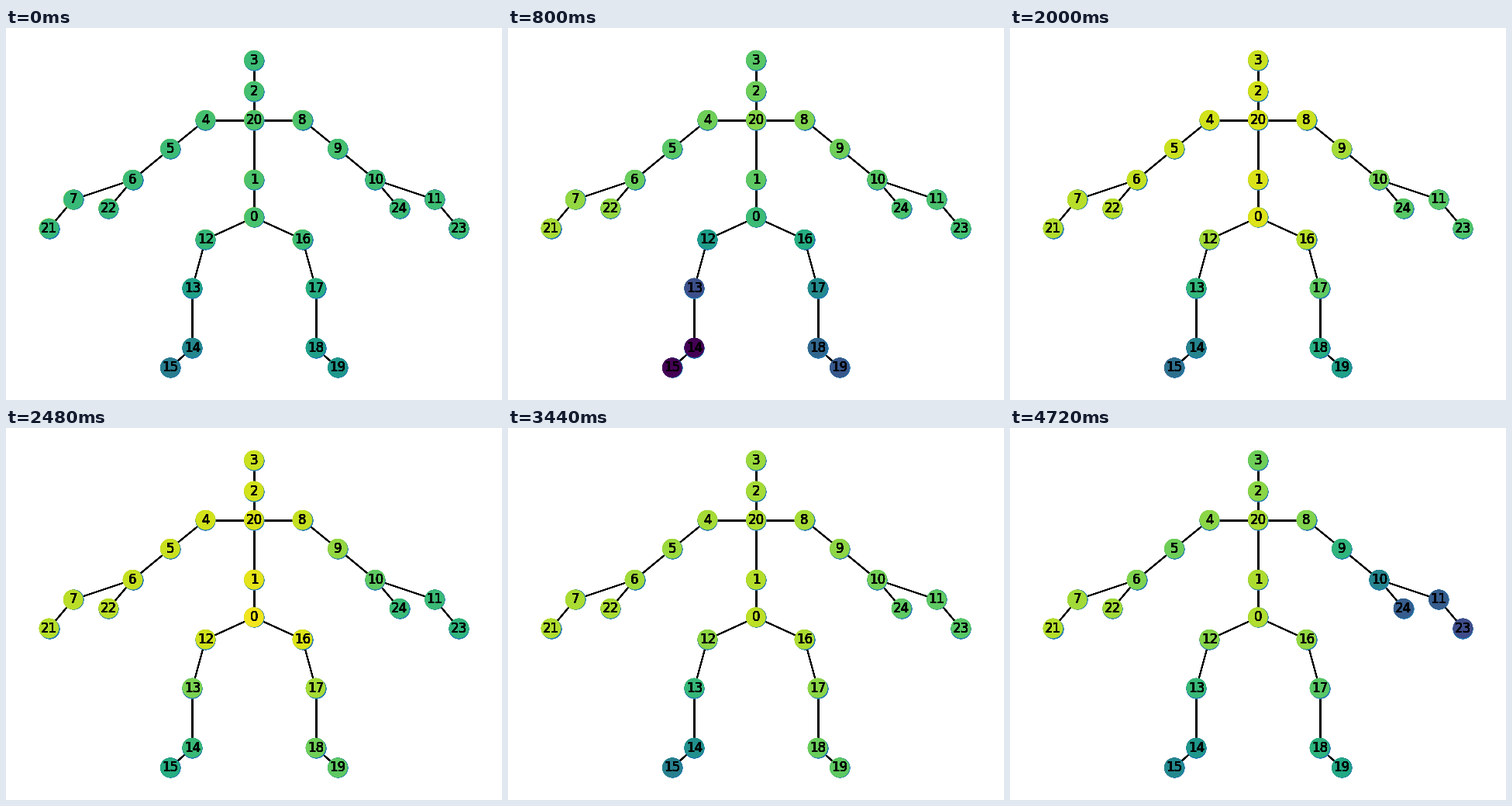
Animation of 640 by 480 pixels, one loop 4.8 s. Source, as a matplotlib script:

```python
import matplotlib.pyplot as plt
import numpy as np
from matplotlib.animation import FuncAnimation
from matplotlib.collections import LineCollection

W, H, DPI = 640, 480, 100
FRAMES, INTERVAL = 60, 80
LAYERS = 10                  # painted layers that stay under the newest one
HALF_W, HEIGHT = 93, 139     # size of the skeleton in grid units
MARGIN = 1.21

# Grid points: distance from the body axis, depth below the head
SPINE = {3: (0, 0), 2: (0, 14), 20: (0, 27), 1: (0, 54), 0: (0, 71)}
ARM = {4: (22, 27), 5: (38, 40), 6: (55, 54), 7: (82, 63)}
HAND = {21: (93, 76), 22: (66, 67)}
LEG = {12: (22, 81), 13: (28, 103), 14: (28, 130), 15: (38, 139)}

# Activity runs smoothly along each chain between its two ends
CHAINS = [
    (3, 2, 20), (20, 1, 0),
    (20, 4, 5), (5, 6, 7, 21),
    (20, 8, 9, 10, 11, 23),
    (0, 12, 13, 14, 15),
    (0, 16, 17, 18, 19),
]
THUMBS = {22: (6, 7), 24: (10, 11)}   # joint: (parent, joint it copies)

# Activity in percent at the key times
KEY_TIMES = [0, 10, 18, 31, 43, 51, 59]
HEAD = (68, 74, 92, 92, 85, 81, 78)
ENDS = {
    3: HEAD,
    5: HEAD,
    20: (72, 82, 94, 94, 88, 88, 87),
    0: (71, 68, 91, 98, 90, 87, 88),
    21: (67, 87, 88, 89, 88, 87, 89),
    23: (68, 70, 80, 65, 74, 42, 23),
    15: (42, -20, 7, 62, 43, 21, 47),
    19: (53, 27, 35, 75, 75, 53, 60),
}


def joint_points():
    pos = dict(SPINE)
    for limb, mirror_step in ((ARM, 4), (HAND, 2), (LEG, 4)):
        for j, (dx, y) in limb.items():
            pos[j] = (-dx, y)
            pos[j + mirror_step] = (dx, y)
    return np.array([pos[j] for j in range(len(pos))])


def activity_at(frame):
    ends = {j: np.interp(frame, KEY_TIMES, keys) / 100
            for j, keys in ENDS.items()}
    level = {}
    for chain in CHAINS:
        start, stop = ends[chain[0]], ends[chain[-1]]
        for j, t in zip(chain, np.linspace(0, 1, len(chain))):
            level[j] = start + (stop - start) * np.sin(t * np.pi / 2) ** 2
    for j, (_, twin) in THUMBS.items():
        level[j] = level[twin]
    return np.array([level[j] for j in range(len(level))])


fig = plt.figure(figsize=(W / DPI, H / DPI), dpi=DPI, facecolor="white")
ax = fig.add_axes([0, 0, 1, 1])
ax.axis("off")

points = joint_points()
bones = [pair for chain in CHAINS for pair in zip(chain, chain[1:])]
bones += [(parent, j) for j, (parent, _) in THUMBS.items()]

# Repeated drawing hardens the soft edges of lines, discs and digits
segments = [points[list(bone)] for bone in bones]
ax.add_collection(LineCollection(segments * 2 * LAYERS, colors="black",
                                 linewidths=1, zorder=1))

layers = []
for _ in range(LAYERS):
    ax.scatter(*points.T, s=300, c="#1f78b4", linewidths=1, zorder=2)
    layers.append(ax.scatter(*points.T, s=300, c=activity_at(0),
                             cmap="viridis", vmin=0, vmax=1,
                             linewidths=1, zorder=2))
    for j, (x, y) in enumerate(points):
        ax.text(x, y, str(j), fontsize=12, family="DejaVu Sans",
                ha="center", va="center", zorder=3)

ax.set_xlim(-MARGIN * HALF_W, MARGIN * HALF_W)
ax.set_ylim(HEIGHT / 2 * (1 + MARGIN), HEIGHT / 2 * (1 - MARGIN))


def update(frame):
    # Older layers keep the colours of earlier moments on their rims
    for lag, layer in enumerate(reversed(layers)):
        layer.set_array(activity_at((frame - lag) % FRAMES))
    return layers


anim = FuncAnimation(fig, update, frames=FRAMES, interval=INTERVAL,
                     init_func=lambda: update(0), repeat=True,
                     repeat_delay=0, blit=False)
plt.show()
```
